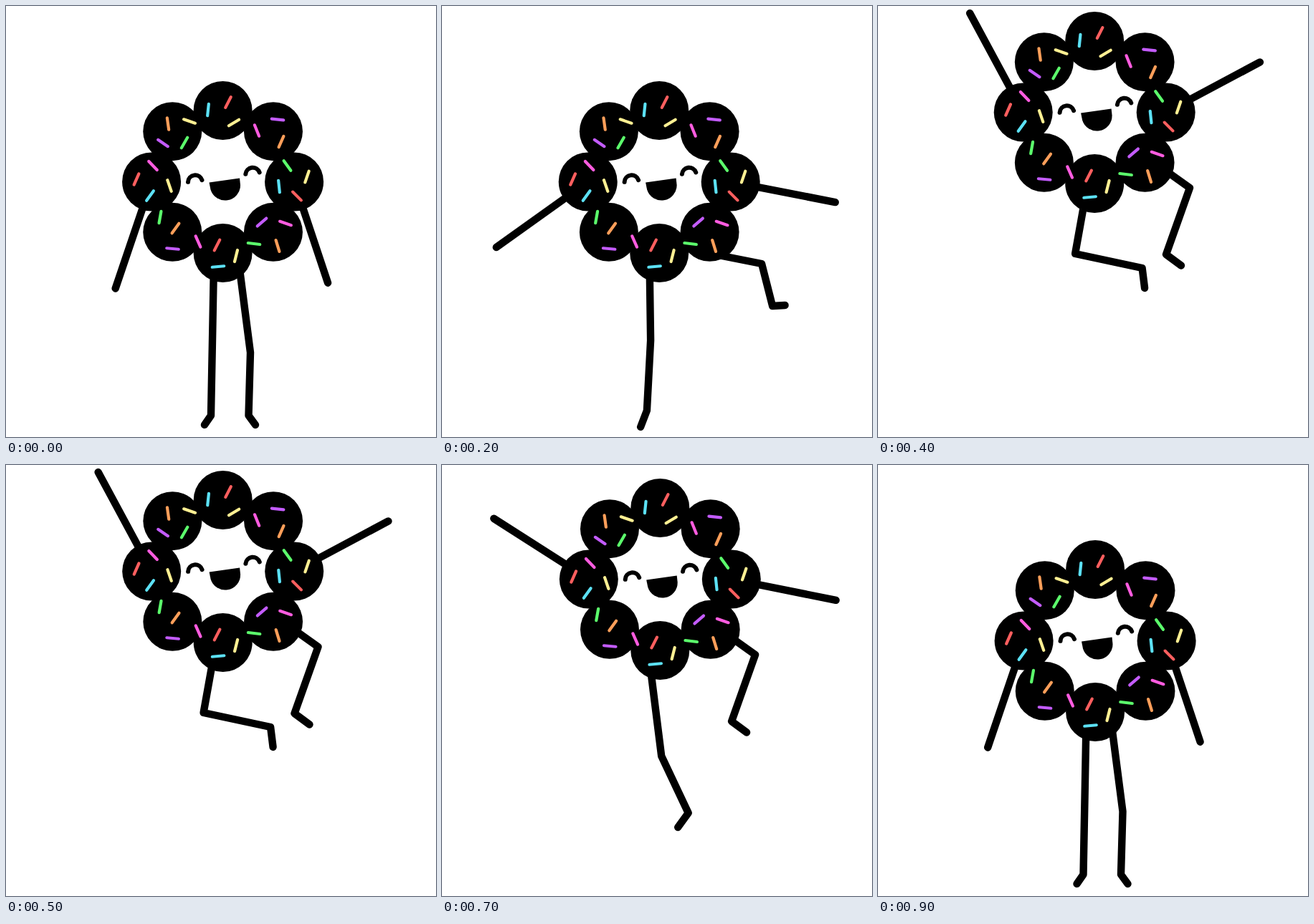
Recreate the animation shown at these times as an HTML page. Size 600 by 602 pixels, loop 1 s.

```html
<!DOCTYPE html>
<html lang="en">
<head>
<meta charset="utf-8">
<title>Jumping sprinkle ring</title>
<style>
  html, body { margin: 0; width: 100%; height: 100%; overflow: hidden; background: #fff; }
  svg { display: block; width: 100vw; height: 100vh; }
  .limbs { fill: none; stroke: #000; stroke-width: 10.4; stroke-linecap: round; stroke-linejoin: round; }
  .sprinkles { stroke-width: 4.2; stroke-linecap: round; }
  .eyes { fill: none; stroke: #000; stroke-width: 6; stroke-linecap: round; }
</style>
</head>
<body>
<svg viewBox="0 0 600 602">
  <g id="figure">
    <g class="limbs">
      <polyline id="armL"/><polyline id="armR"/>
      <polyline id="legL"/><polyline id="legR"/>
    </g>
    <g id="balls"></g>
    <g id="sprinkles" class="sprinkles"></g>
    <path class="eyes" d="M254 245.8A10 10 0 0 1 273.5 243.2M334.3 234.8A10 10 0 0 1 353.7 232.4"/>
    <path d="M283.5 246.5L326 240.5L327 250A21.2 21.2 0 0 1 285.5 256.5Z"/>
  </g>
</svg>
<script>
(() => {
  const $ = id => document.getElementById(id);
  const CX = 302.6, CY = 245.5, RING = 99.5;
  const STEP = 100;
  const polar = (x, y, r, deg) => {
    const a = deg * Math.PI / 180;
    return [x + r * Math.cos(a), y + r * Math.sin(a)];
  };

  $('balls').innerHTML = Array.from({ length: 8 }, (_, i) => {
    const [x, y] = polar(CX, CY, RING, i * 45);
    return `<circle cx="${x}" cy="${y}" r="41"/>`;
  }).join('');

  // Per colour: centre and tilt of each sprinkle
  const sprinkles = {
    '#5ce1f5': '282 145 96, 381 252 84, 201 265 126, 296 364 -5',
    '#ff5f5f': '310 134.5 117, 406 265.5 45, 182 242 114, 294.5 334 117',
    '#fff093': '318 163 149, 256 161 19, 420 238.5 109, 228 251 71, 321 349 104',
    '#ff9f5a': '226 164.5 82, 384 189.5 114, 236.5 310.5 126, 379 335 73',
    '#c45cff': '219 191.5 34, 379 158.5 6, 232.5 339 5, 357 302 139',
    '#5cff6c': '249 191 120, 392.5 223 54, 215 295 100, 346 332 7',
    '#ff5ce0': '350 174 68, 205 223 46, 268 329 66, 390 303.5 19'
  };
  $('sprinkles').innerHTML = Object.entries(sprinkles).map(([color, spots]) =>
    spots.split(', ').map(spot => {
      const [x, y, tilt] = spot.split(' ');
      return `<path d="M-8.3 0H8.3" stroke="${color}" transform="translate(${x} ${y}) rotate(${tilt})"/>`;
    }).join('')
  ).join('');

  const mix = (a, b, k = 0.5) => a.map((v, i) => v + (b[i] - v) * k);

  // Hip, knee, ankle, toe, relative to the resting body
  const left = {
    stand: [290, 360, 288, 467, 286, 572, 277, 585],
    push: [290, 360, 288.5, 468, 286.5, 571, 279, 594.5],
    point: [289, 360, 290.5, 467, 285.3, 565, 276.5, 588],
    trail: [288, 361, 304.5, 492.5, 342, 572, 327.5, 592],
    fold: [290, 362, 275.5, 443, 369, 463, 372.5, 491]
  };
  const right = {
    stand: [325, 360, 341, 484, 338.5, 572, 348, 585],
    kick: [375, 346, 445.5, 360, 460.5, 419, 478, 418],
    tuck: [392, 320, 435.4, 351, 402.4, 444, 423.4, 459.5]
  };
  const halfKick = mix(right.stand, right.kick);

  // Body offset, arm angles in degrees, leg shapes
  const pose = (dx, dy, armL, armR, legL, legR) => ({ dx, dy, armL, armR, legL, legR });
  const rest = dx => pose(dx, 0, 108.7, 71.6, left.stand, right.stand);
  const air = (dx, armL, armR) => pose(dx, -86, armL, armR, left.trail, right.tuck);
  const peak = dx => pose(dx, -97, 241.7, -28.1, left.fold, right.tuck);

  const poses = [
    rest(0),
    pose(0.3, 0, 126.6, 41.4, left.push, halfKick),
    pose(0.6, 0, 144.4, 11.1, left.point, right.kick),
    air(0.6, 226.1, -16.7),
    peak(-0.4), peak(0.1), peak(0.6),
    air(1.7, 212.6, 11.4),
    pose(1, 0, 160, 41.4, mix(left.stand, left.push), halfKick),
    rest(0.5)
  ];

  const line = (id, points) => $(id).setAttribute('points', points.join(' '));
  const arm = (id, x, length, deg) => line(id, [x, CY, ...polar(x, CY, length, deg)]);

  const draw = p => {
    $('figure').setAttribute('transform', `translate(${p.dx} ${p.dy})`);
    arm('armL', CX - RING, 157.3, p.armL);
    arm('armR', CX + RING, 148.8, p.armR);
    line('legL', p.legL);
    line('legR', p.legR);
  };

  const start = performance.now();
  const tick = now => {
    const t = Math.max(0, now - start);
    draw(poses[Math.floor(t / STEP) % poses.length]);
    requestAnimationFrame(tick);
  };
  tick(start);
})();
</script>
</body>
</html>
```
